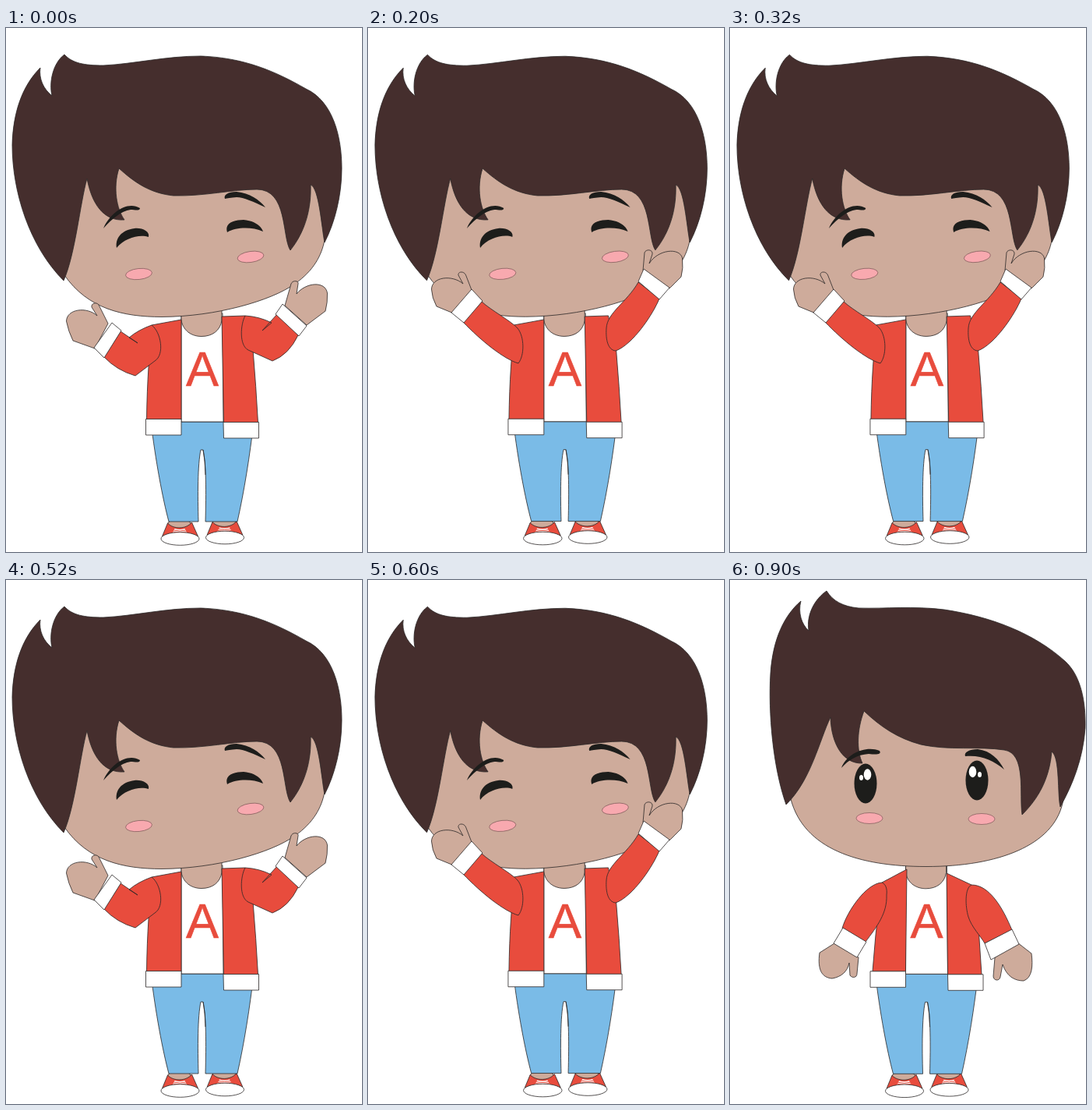
Write an HTML page that moves like this. It is 457 by 672 pixels and loops after 1000 ms.

```html
<!DOCTYPE html>
<html lang="en">
<head>
<meta charset="utf-8">
<title>Cheering boy</title>
<style>
  html, body { margin: 0; width: 100%; height: 100%; overflow: hidden; background: #fff; }
  svg { display: block; width: 457px; height: 672px; }
  .line { stroke: #2b2727; stroke-width: .8; stroke-linejoin: round; }
  .hair { fill: #452e2d; }
  .skin { fill: #ceab9b; }
  .red { fill: #e84c3d; }
  .white { fill: #fff; }
  .blue { fill: #7abbe7; }
  .ink { fill: #1d1d1b; }
  .blush { fill: #f8a9af; stroke: #6b4a4a; stroke-width: .6; }
  .open { fill: none; }
  .letter { font: 63px 'Liberation Sans', Arial, sans-serif; text-anchor: middle; stroke: #e84c3d; stroke-width: .6; }
  .pose { visibility: hidden; animation: 1s step-end infinite; }
  #up { animation-name: up; }
  #cheer { animation-name: cheer; }
  #rest { animation-name: rest; }
  @keyframes up {
    0%, 40%, 80% { visibility: visible; }
    20%, 60%, 90%, 100% { visibility: hidden; }
  }
  @keyframes cheer {
    0%, 40%, 80%, 100% { visibility: hidden; }
    20%, 60% { visibility: visible; }
  }
  @keyframes rest {
    0%, 100% { visibility: hidden; }
    90% { visibility: visible; }
  }
</style>
</head>
<body>
<svg viewBox="0 0 457 672" xmlns="http://www.w3.org/2000/svg">
  <defs>
    <g id="shoe">
      <ellipse class="skin line" cx="-1" cy="-19" rx="15" ry="6"/>
      <path class="red line" d="M-16-20C-9-12 8-12 15-21L23-3C12-9-12-9-23-3Z"/>
      <path class="white" d="M-7-13Q0-11 6-13L9-7Q0-9-10-7Z"/>
      <path class="open" stroke="#e84c3d" d="M-8-11Q0-9 7-11M-9-9Q0-7 8-9"/>
      <ellipse class="white line" rx="24.5" ry="8.3"/>
    </g>

    <g id="base">
      <use href="#shoe" x="223.5" y="655"/>
      <use href="#shoe" x="281" y="653.5"/>
      <path class="blue line" d="M186 505H318C313 548 306 593 297 633H256C257 595 257 560 253 541H250C246 560 246 600 247 633H209C201 603 192 555 186 505Z"/>
      <path class="line open" d="M253 541Q256 556 256 573"/>
      <path class="white line" d="M225 366H278L279 505H225Z"/>
      <path class="skin line" d="M225 360V375C228 390 240 395.500 251 395.500C265 395.500 275 388 277 375V360Z"/>
      <text class="red letter" x="252" y="459">A</text>
    </g>

    <g id="hems" class="white line">
      <path d="M179.500 501.500H225V522H179.500Z"/>
      <path d="M279 505.500H324.500V526H279.500Z"/>
    </g>

    <g id="open-jacket" class="red line">
      <path d="M187 381L225 374V502H180.500Q181 465 183 435Z"/>
      <path d="M277 370L307 369L317 412Q321 460 323.500 506H279.500Z"/>
    </g>

    <g id="smile">
      <path class="skin line" d="M75 317C105 360 150 370.500 200 370.500C270 370 340 350 371 328C395 311 405 292 409 272L395 150H100Z"/>
      <path class="hair line" d="M74 324C30 280 8 210 8 150C9 110 20 75 44 51C42 65 48 78 59 87C55 70 60 45 75 34C85 45 100 48 125 48C165 46 205 36 250 36C305 38 345 55 385 78C420 94 431 140 431 180C431 215 422 250 409 275C405 255 402 205 391 201C392 230 385 260 365 285C354 268 362 207 322 207C290 207 255 216 215 215C185 212 165 198 145 180C137 205 142 232 152 246C125 248 110 225 104 193C95 225 89 290 74 324Z"/>
      <g class="ink">
        <path d="M125 257C133 238 155 221 172 231C172 235 165 233 160 233C147 235 136 245 125 257Z"/>
        <path d="M281 219C279 214 285 210 296 210C313 212 325 220 333 230C318 223 305 217 296 217Q285 218 281 219Z"/>
        <path d="M142 282C140 270 148 259 165 257C175 256 185 261 183 268C172 264 152 269 142 282Z"/>
        <path d="M284 262C280 250 293 246 305 246C318 247 327 253 330 261C316 255 296 255 284 262Z"/>
      </g>
      <ellipse class="blush" rx="17" ry="7" transform="translate(170.500 315.500) rotate(-6)"/>
      <ellipse class="blush" rx="17" ry="7" transform="translate(314 293.500) rotate(-8)"/>
    </g>
  </defs>

  <g id="up" class="pose">
    <use href="#base"/>
    <use href="#open-jacket"/>
    <use href="#hems"/>
    <use href="#smile"/>
    <g class="line">
      <path class="skin" d="M131 379L119 355C116 351 109 353 110 358L117 369C104 357 78 360 77.500 376Q80 389 86 401L114 411Z"/>
      <path class="red" d="M147 389L169 404L158 397Q170 387 187 381C199 390 204 419 191 427L166 446Q142 439 126 422Z"/>
      <path class="white" d="M136 378L148 388L126 423L113 410Z"/>
      <path class="skin" d="M358 356L366 328C368 323 376 324 375 328L373 341C385 326 410 324 412.500 340Q413 352 410 363L386 381Z"/>
      <path class="red" d="M349 366L329 388L341 378Q325 370 307 369C301 380 299 407 311 413L342 427Q363 419 375 394Z"/>
      <path class="white" d="M355 354L386 382L376 395L346 367Z"/>
    </g>
  </g>

  <g id="cheer" class="pose">
    <g transform="translate(-1 .5) scale(1.008 .9985)">
      <use href="#base"/>
      <use href="#open-jacket"/>
      <use href="#hems"/>
    </g>
    <use href="#smile" transform="translate(.9 .3) scale(1.008 .9985)"/>
    <g class="line">
      <path class="skin" d="M133 336L126 318C124 311 115 312 116 317L122 328C108 316 82 319 81.500 335Q82 346 88 357L110 366Z"/>
      <path class="red" d="M146 351C158 362 184 376 192 385C201 396 201 420 193 430C175 425 145 401 122 377Z"/>
      <path class="white" d="M133 335L147 350L123 378L107 365Z"/>
      <path class="skin" d="M353 311L355 288C357 283 366 284 365 290L361 302C372 284 400 281 403.500 295Q405 308 402 319L387 334Z"/>
      <path class="red" d="M347 326C332 352 307 365 306 385C305 400 308 413 318 414C340 406 366 367 374 347Z"/>
      <path class="white" d="M354 309L387 333L374 348L347 325Z"/>
    </g>
  </g>

  <g id="rest" class="pose">
    <use href="#base" x=".5" y=".3"/>
    <g class="red line">
      <path d="M227 371L195 388L187 455L183 502H225.500Z"/>
      <path d="M278 376L310 391L319 445L323 506H279.500Z"/>
    </g>
    <use href="#hems" x=".5" y=".3"/>
    <path class="skin line" d="M78 281C95 345 165 367.500 252 367.500C345 367.500 415 340 427 286V150H120Z"/>
    <path class="hair line" d="M72 288C55 240 49 170 52 120C55 75 70 45 91 27C87 42 92 57 101 65C98 45 108 25 124 14C132 27 145 34 165 36C200 37 235 33 275 38C335 47 390 68 430 104C450 122 457 155 456 190C453 230 440 262 424 291C420 275 424 228 413 220C410 255 396 280 375 301C371 275 381 222 352 218C320 213 280 219 245 211C215 203 193 188 172 168C163 192 162 218 170 235C145 236 130 210 129 176C115 205 104 257 72 288Z"/>
    <g class="ink">
      <path d="M143 241C150 222 175 212 192 219C195 224 188 224 178 223C163 224 152 231 143 241Z"/>
      <path d="M302 226C300 221 307 217 318 217C335 219 345 230 352 243C338 231 322 224 302 226Z"/>
      <ellipse cx="174" cy="261" rx="14.500" ry="25.500"/>
      <ellipse cx="317" cy="257" rx="14.500" ry="25.500"/>
    </g>
    <g class="white">
      <ellipse cx="176.500" cy="249.500" rx="4.800" ry="7.200"/>
      <ellipse cx="168.500" cy="253.500" rx="2.500" ry="3.500"/>
      <ellipse cx="311.500" cy="246" rx="4.800" ry="7.200"/>
      <ellipse cx="320.500" cy="249.500" rx="2.500" ry="3.500"/>
    </g>
    <ellipse class="blush" cx="179" cy="305.500" rx="17" ry="7"/>
    <ellipse class="blush" cx="323" cy="306.500" rx="17" ry="7"/>
    <g class="line">
      <path class="skin" d="M134 466L115 478C112 500 118 510 131 511C143 509 151 502 153 491L154 507C157 511 163 510 163 505L165 484Z"/>
      <path class="red" d="M144 447C150 425 175 389 195 388C200 390 202 396 201 404C202 427 189 444 174 464Z"/>
      <path class="white" d="M145 446L175 464L163 484L133 466Z"/>
      <path class="skin" d="M340 484L338 508C338 514 346 515 347 509L350 493C355 508 365 514 377 514C388 510 389 495 387 479L369 465Z"/>
      <path class="red" d="M327 466C322 457 310 445 306 432C302 419 301 395 310 391C333 391 350 420 362 449Z"/>
      <path class="white" d="M327 466L362 448L371 467L335 487Z"/>
    </g>
  </g>
</svg>
</body>
</html>
```
